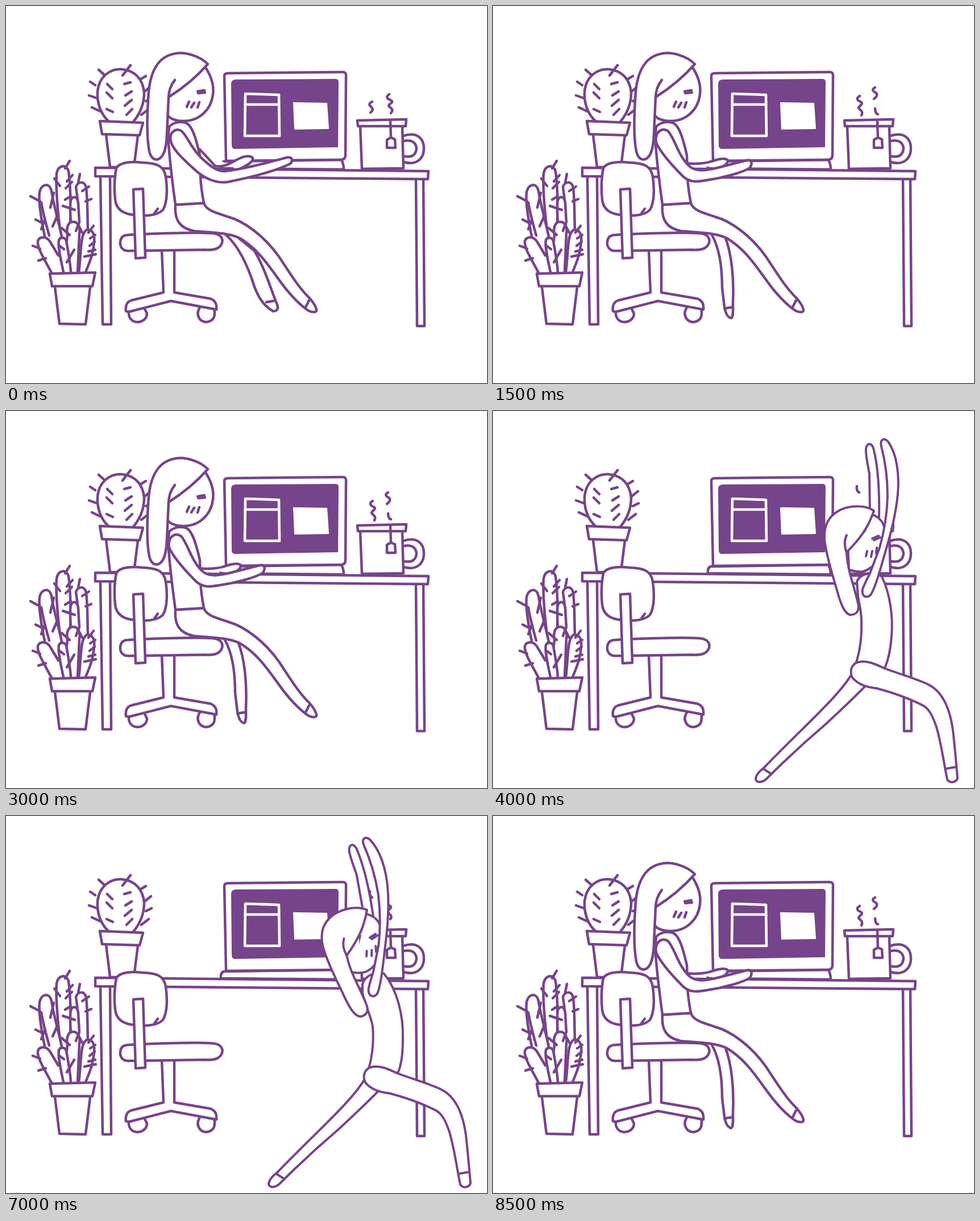
These frames come from a looping animation (846x662 px, 9 s). An HTML page:

```html
<!DOCTYPE html>
<html lang="en">
<head>
<meta charset="utf-8">
<title>Desk stretch</title>
<style>
  html, body { margin: 0; width: 100%; height: 100%; overflow: hidden; background: #fff; }
  svg { display: block; width: 100%; height: 100%; }
  path { fill: #fff; stroke: #76448a; stroke-width: 4.5; stroke-linecap: round; stroke-linejoin: round; }
  .line { fill: none; }
  .solid { fill: #76448a; stroke: none; }
  .pane { fill: none; stroke: #fff; stroke-width: 4.6; }
  .card { stroke: #fff; stroke-width: 2; }
  .stand path { stroke-width: 4; }
</style>
</head>
<body>
<svg id="stage" viewBox="0 0 846 662"></svg>
<script>
const stage = document.getElementById('stage');
const shape = (d, cls = '') => `<path class="${cls}" d="${d}"/>`;
const line = d => shape(d, 'line');
const group = (content, attrs = '') => `<g ${attrs}>${content}</g>`;

const roundCactus =
  shape('M180 202C165 188 160 168 161 150C164 122 185 110 203 111C228 113 241 130 243 152C243 172 235 190 224 203') +
  line('M163 112L173 121M148 133L157 139M146 157L160 162M151 178L166 185M219 104L205 122M236 129L246 123M245 149L255 141M246 167L256 162M238 191L251 181') +
  line('M178 137L187 146M177 152L187 162M177 181L188 186M208 137L219 134M210 157L221 150M209 175L221 165M212 191L222 181') +
  shape('M176 226L183 283H225L232 227') +
  shape('M165 202L241 205L235 227L169 225Z');

const desk =
  shape('M166 300L170 559H185L183 301') +
  shape('M721 303L723 562H736L734 303') +
  shape('M157 284L743 290L742 304L157 299Z');

const laptop =
  shape('M383 273L590 270Q594 278 594 287L378 285Q377 275 383 273Z') +
  shape('M384 123Q384 118 391 118L592 116Q599 116 598 124L597 262Q597 270 588 270L387 272Z') +
  shape('M396 136Q396 130 404 129L580 128Q585 128 585 134L584 248L402 251Q397 250 397 245Z', 'solid') +
  shape('M421 154L480 156L481 228L420 228ZM422 173H480', 'pane') +
  shape('M506 170L564 171L567 215L508 216Z', 'card');

const mug =
  shape('M699 228C722 220 735 232 735 250C735 270 720 280 700 274') +
  shape('M700 237C714 234 721 240 722 250C721 262 714 266 701 264') +
  shape('M623 211L626 286L699 285L697 211') +
  shape('M618 201L704 199L703 211L619 211Z') +
  line('M676 203L677 231') +
  shape('M670 235L677 231L684 234L685 249H670Z');

const tallCactus =
  shape('M97 405C92 375 87 320 89 294C92 279 106 277 110 290C114 320 114 350 113 380') +
  shape('M128 390C128 360 125 330 123 318C126 308 138 306 141 319C144 345 143 370 144 392') +
  shape('M68 404C62 375 57 345 59 327C63 311 77 310 80 325C85 355 93 380 98 405') +
  line('M62 345C66 368 71 385 76 403') +
  shape('M114 380C113 365 112 350 114 341C119 331 126 336 127 346L129 380') +
  shape('M101 467L108 402C105 385 112 378 119 379C128 380 131 390 129 400L126 468') +
  shape('M128 468C133 430 130 400 142 393C155 392 156 405 155 415C152 440 147 450 140 467') +
  shape('M101 467C95 440 91 420 93 411C96 405 103 406 106 412C110 435 113 450 114 467') +
  line('M81 470C65 440 55 425 56 413C58 405 70 403 77 413L92 438') +
  line('M43 334L60 343M52 375L64 381M112 272L104 285M130 295L127 310M117 297L107 308M146 317L134 325M105 320L116 309M140 343L150 339M47 421L60 426M57 447L70 443M62 392L68 376M82 387L92 364') +
  line('M78 354L84 328M85 303L95 316M100 351L121 358M104 340L114 334M123 395L127 384M134 398L130 390M145 398L154 386M148 408L157 402M147 421L156 414M145 431L157 428M138 440L158 436M107 450L120 428M94 421L102 427M98 390L112 402') +
  shape('M86 493L94 558L140 559L148 494') +
  shape('M77 470L157 468L152 492L81 492Z');

const chair =
  shape('M216 537C215 548 222 555 231 555C241 555 248 548 248 540L242 528') +
  shape('M342 528C336 536 336 544 342 551C350 558 362 555 366 546Q368 538 366 530') +
  shape('M274 428L277 503L220 517Q209 521 211 536L216 537L290 518L370 533Q372 519 360 514L296 503V428') +
  shape('M194 285C200 273 225 273 240 275C265 276 278 280 281 300C284 320 284 345 276 358C265 369 245 369 228 367C208 366 194 358 192 340C190 320 191 300 194 285Z') +
  line('M261 364L267 356') +
  shape('M215 402C240 400 330 397 362 399C378 400 382 408 380 416C376 427 365 429 350 428L215 430C203 430 200 420 201 414C202 405 208 402 215 402Z') +
  shape('M224 322L241 321L245 442L228 443Z');

const steam = {
  low: line('M644 168C636 172 640 175 643 178C647 182 644 185 641 187') +
    line('M674 155C667 160 671 163 676 165C684 169 674 171 673 175C674 179 684 180 677 188'),
  mid: line('M645 158C638 162 641 166 646 168C654 172 643 175 643 179C645 183 652 184 648 192') +
    line('M672 143C665 147 669 150 673 152C678 156 674 160 670 163M672 180C672 185 674 190 677 190'),
  high: line('M640 132C639 137 641 142 644 143M645 170C638 175 645 178 647 181C649 184 644 188 643 190') +
    line('M672 147C664 152 669 155 674 157C682 161 672 164 671 168C673 172 681 174 676 181')
};

const head =
  shape('M351 108C362 125 366 140 364 155C361 182 340 202 312 202C300 202 290 199 284 192') +
  shape('M355 102C340 87 315 81 300 83C270 87 255 110 251 150C248 190 247 230 252 255C255 268 262 271 268 269C278 265 282 250 283 225L286 160C310 145 333 127 355 102Z') +
  line('M297 130C288 141 286 152 286 162') +
  line('M337 150L349 148M338 153L350 152M318 177L322 168M326 178L331 170M337 178L340 169');

const torso = shape('M287 212C295 203 310 202 318 206C328 212 334 232 341 262L342 300C343 320 345 330 348 346L298 349C294 320 287 260 285 230Z');

const nearLeg =
  shape('M298 349C296 375 305 390 330 395C360 398 385 397 410 407C450 430 470 470 495 500C510 518 520 527 532 535C540 539 547 538 546 533C544 524 538 518 534 513C515 495 500 470 480 440C455 405 420 378 390 370C365 362 352 358 348 346Z') +
  line('M527 529L533 517');

const reach = {
  leg: shape('M382 398C405 415 420 445 432 478C440 505 450 525 470 536C478 536 480 530 476 522C465 495 455 460 437 430L400 400') + line('M458 520L470 518'),
  farArm: shape('M341 252L368 281C385 284 395 275 410 268C420 263 430 262 434 267C435 274 425 279 408 288'),
  arm: shape('M290 238C286 222 298 214 308 219C318 226 325 250 345 268C360 282 372 291 385 290C420 286 460 275 494 266C504 264 505 272 500 277C470 292 420 303 390 309C370 312 350 303 335 290C315 272 295 255 290 238Z')
};
const rest = {
  leg: shape('M385 402C398 425 403 460 403 495L407 528C409 540 413 547 419 548C423 545 422 535 422 520C424 480 420 435 408 405') + line('M407 531L421 529'),
  farArm: shape('M340 276C355 278 375 277 390 271C400 268 410 267 413 271C413 277 408 280 398 285'),
  arm: shape('M287 240C284 222 296 213 307 219C318 228 325 262 344 280C355 291 370 290 395 284L446 271C455 269 457 276 452 284C440 292 405 302 375 306C358 309 347 310 335 300C318 283 295 258 287 240Z')
};
const sit = limbs => group(limbs.leg + nearLeg + limbs.farArm + torso + limbs.arm + head);

const walk = group(
  shape('M528 364C526 420 495 500 420 620C410 632 404 640 405 647C410 654 420 650 427 642C465 595 525 520 556 440L570 370') +
  line('M418 624L433 633') +
  shape('M528 364C526 420 560 480 578 545C585 580 588 615 592 645C597 653 608 653 611 646C612 600 608 550 600 505C592 450 586 400 578 361Z') +
  line('M591 629L610 627') +
  group(torso + head, 'transform="translate(230 15)"') +
  shape('M520 250C516 235 530 229 540 236C550 260 552 320 556 380C557 392 545 394 541 384C535 340 524 300 520 250Z'),
  'class="stand"');

const farReach = shape('M663 178L662 110C658 90 655 75 656 66C658 56 665 55 669 65C678 100 680 140 679 188');
const stretchHead =
  shape('M668 182C685 190 690 200 689 220C688 250 675 275 650 282C640 283 633 281 627 279') +
  shape('M670 175C655 165 630 165 610 174C590 185 582 200 583 225C586 255 598 290 605 315C612 340 618 355 628 358C640 358 645 350 642 338C635 305 623 280 622 248C645 225 660 205 670 175Z') +
  line('M622 249C618 238 617 228 622 218') +
  line('M667 224L678 219M670 227L681 222M656 255L658 246M665 256L667 246M674 250L675 240') +
  shape('M683 62C680 50 688 46 695 54C710 75 715 110 712 145C708 190 695 230 685 265C678 290 670 315 664 323C656 330 648 325 650 313C653 304 658 295 663 285L680 240C688 212 693 182 694 150C694 115 689 85 683 62Z');
const lungeBack =
  shape('M632 460C610 500 540 560 477 626C469 632 462 640 462 647C465 654 475 652 482 645C500 627 545 584 585 550C620 518 640 498 655 483') +
  line('M475 628L489 637');
const lungeFront =
  shape('M689 452C715 462 745 470 765 480C790 492 805 520 810 570C813 600 815 620 817 645C814 653 803 654 799 647C793 620 790 590 780 555C773 535 768 525 758 518C735 506 705 495 675 487C655 485 640 478 632 468C626 455 632 444 642 441C660 437 675 446 689 452Z') +
  line('M797 628L815 625');

// The head and arms turn as one piece while the trunk bends beneath them.
const stretch = (trunk, angle, dx, dy) => {
  const turn = `transform="translate(${dx} ${dy}) rotate(${angle} 630 358)"`;
  return group(lungeBack + group(farReach, turn) + shape(trunk) + lungeFront + group(stretchHead, turn), 'class="stand"');
};

const poses = {
  reach: steam.low + sit(reach),
  rest: steam.mid + sit(rest),
  pause: steam.high + sit(rest),
  walk: steam.high + walk,
  upright: steam.high + stretch('M640 300C645 285 670 280 684 291C698 320 704 360 701 395C699 425 694 440 689 452L632 460C645 430 649 400 648 370C648 350 644 340 642 325Z', 0, 0, 0),
  lean: steam.high + stretch('M627 295C632 280 650 272 665 277C688 305 699 350 698 390C698 425 694 440 689 452L632 460C645 430 647 395 645 370C642 350 630 330 627 310Z', -9.3, -5, -6),
  arch: steam.high + stretch('M608 318C610 300 625 288 642 291C672 305 692 345 693 390C694 425 692 440 689 452L632 460C645 430 650 405 643 385C636 362 612 340 608 318Z', -25, -5, 19)
};

stage.innerHTML = roundCactus + desk + laptop + mug + tallCactus + chair +
  Object.entries(poses).map(([name, art]) => group(art, `id="${name}" display="none"`)).join('');

const stepTime = 500;
const steps = ['reach', 'rest', 'reach', 'rest', 'reach', 'pause', 'rest', 'walk', 'upright', 'lean',
  'arch', 'arch', 'arch', 'arch', 'lean', 'upright', 'walk', 'rest'];
const start = performance.now();
let shown = '';

function draw(now) {
  const elapsed = Math.max(0, now - start);
  const pose = steps[Math.floor(elapsed / stepTime) % steps.length];
  if (pose !== shown) {
    if (shown) document.getElementById(shown).setAttribute('display', 'none');
    document.getElementById(pose).removeAttribute('display');
    shown = pose;
  }
  requestAnimationFrame(draw);
}
draw(start);
</script>
</body>
</html>
```
